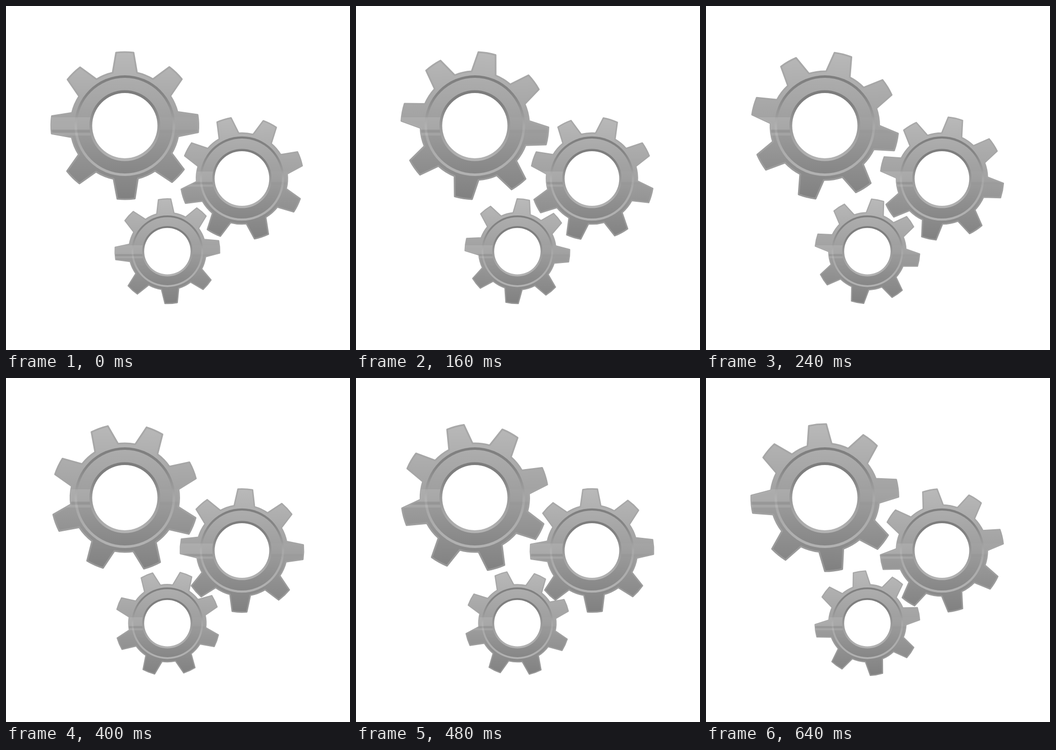
Recreate the animation shown at these times as an HTML page with a canvas. Size 680x680 px, loop 720 ms.

```html
<!DOCTYPE html>
<html lang="en">
<head>
<meta charset="utf-8">
<title>Turning gears</title>
<style>
  html, body { margin: 0; width: 100%; height: 100%; overflow: hidden; background: #fff; }
  canvas { display: block; width: 100vw; height: 100vh; }
</style>
</head>
<body>
<canvas id="stage" width="680" height="680"></canvas>
<script>
const ctx = document.getElementById('stage').getContext('2d');
const STEP = 80, STEPS = 9, TEETH = 8, TURN = 4.9;
const TAU = Math.PI * 2, RAD = Math.PI / 180;

// One gear design, measured at the size of the largest gear.
const TIP = 145.4, BODY = 107.4, TIP_HALF = 17.2, ROOT_HALF = 24;

// Teeth lean slightly towards the upper right of the stage.
const LEAN = 1.25 * RAD, LEAN_AT = 112 * RAD;

const gears = [
  { x: 234.9, y: 236.5, size: 1, start: -0.5, dir: 1 },
  { x: 466.4, y: 341, size: 0.837, start: -17.8, dir: -1 },
  { x: 319, y: 484.7, size: 0.711, start: -3.6, dir: 1 }
];

function shade(top, bottom, ...stops) {
  const g = ctx.createLinearGradient(0, top, 0, bottom);
  stops.forEach(([at, color]) => g.addColorStop(at, color));
  return g;
}

const paint = {
  body: shade(-147, 147, [0, '#b9b9b9'], [0.5, '#a0a0a0'], [1, '#808080']),
  edge: shade(-147, 147, [0, '#a9a9a9'], [0.5, '#a4a4a4'], [1, '#969696']),
  disc: shade(-95, 95, [0, '#adadad'], [0.5, '#9d9d9d'], [1, '#868686']),
  groove: shade(-99, 99, [0, '#7e7e7e'], [0.2, '#858585'], [0.5, '#a6a6a6'], [1, '#b2b2b2']),
  rim: shade(-70, 70, [0, '#7c7c7c'], [0.2, '#808080'], [0.5, '#999999'], [1, '#b4b4b4'])
};

function toothAngle(angle, i) {
  const a = angle * RAD + i * TAU / TEETH;
  return a - LEAN * Math.cos(a - LEAN_AT) - Math.PI / 2;
}

function outline(angle) {
  const tip = Math.asin(TIP_HALF / TIP), root = Math.asin(ROOT_HALF / BODY);
  const path = new Path2D();
  for (let i = 0; i < TEETH; i++) {
    const a = toothAngle(angle, i), next = toothAngle(angle, i + 1);
    path.arc(0, 0, TIP, a - tip, a + tip);
    path.arc(0, 0, BODY, a + root, next - root);
  }
  path.closePath();
  return path;
}

function disc(r, fill) {
  ctx.beginPath();
  ctx.arc(0, 0, r, 0, TAU);
  ctx.fillStyle = fill;
  ctx.fill();
}

function band(x, y, w, h, color) {
  ctx.fillStyle = color;
  ctx.fillRect(x, y, w, h);
}

function drawGear(gear, step) {
  ctx.save();
  ctx.translate(gear.x, gear.y);
  ctx.scale(gear.size, gear.size);
  const shape = outline(gear.start + gear.dir * TURN * step);
  ctx.lineJoin = 'round';
  ctx.lineWidth = 3.4;
  ctx.fillStyle = paint.body;
  ctx.strokeStyle = paint.edge;
  ctx.fill(shape);
  ctx.stroke(shape);

  disc(99.5, paint.groove);
  disc(94.5, paint.disc);

  // Fixed reflections across the flanks.
  ctx.save();
  ctx.clip(shape);
  band(-150, -16.5, 82, 24.5, 'rgba(255,255,255,.11)');
  band(-150, 8, 82, 6, 'rgba(0,0,0,.035)');
  band(-150, 14, 82, 5.5, 'rgba(255,255,255,.1)');
  band(68, -16.5, 82, 30, 'rgba(255,255,255,.025)');
  band(68, 8, 82, 6, 'rgba(0,0,0,.025)');
  ctx.restore();

  disc(70, paint.rim);
  disc(64.5, '#fff');
  ctx.restore();
}

function draw(now) {
  const step = Math.floor(now / STEP) % STEPS;
  ctx.fillStyle = '#fff';
  ctx.fillRect(0, 0, 680, 680);
  gears.forEach(gear => drawGear(gear, step));
}

const begin = performance.now();
function tick() {
  draw(performance.now() - begin);
  requestAnimationFrame(tick);
}
tick();
</script>
</body>
</html>
```
